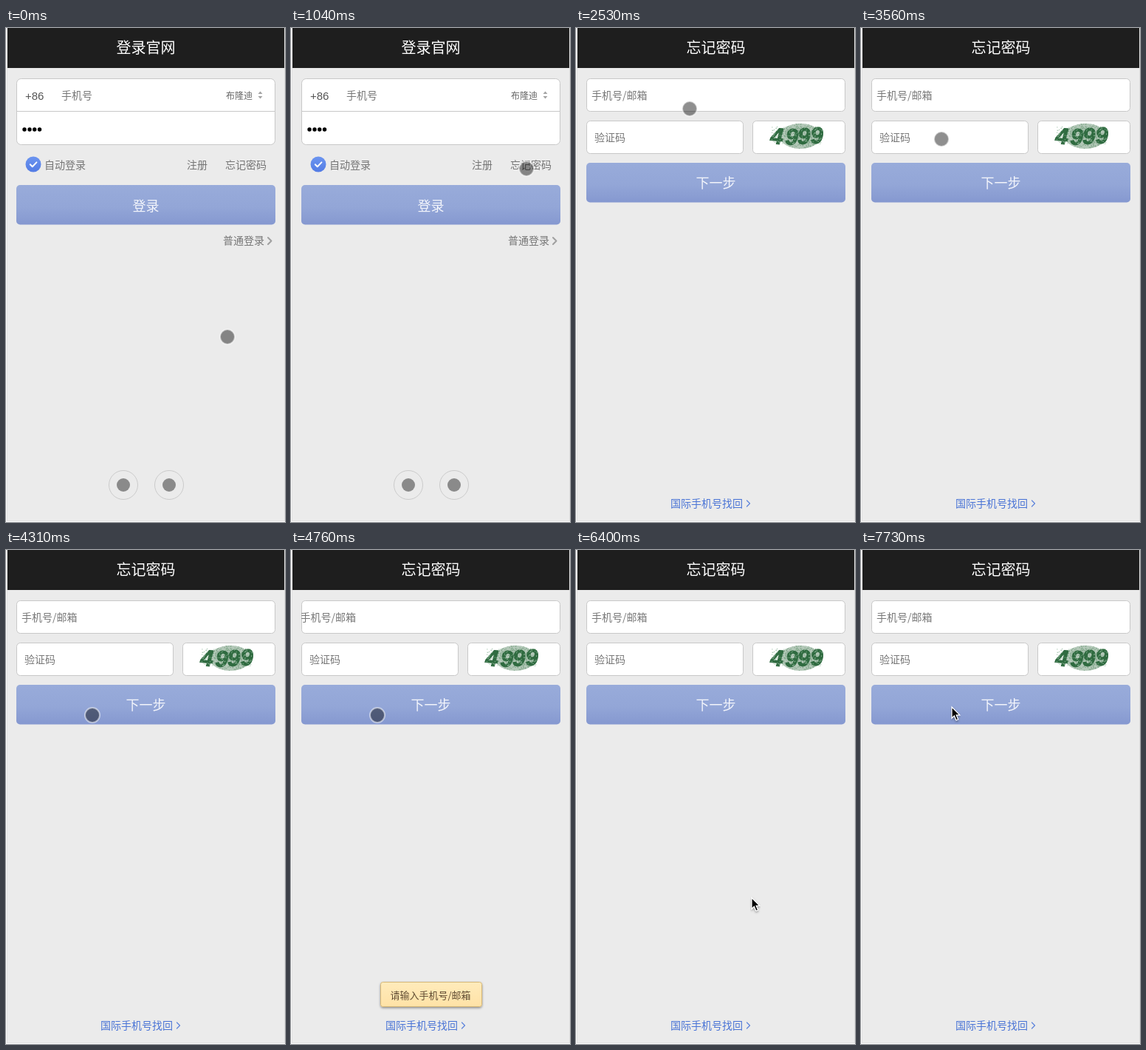
An HTML page that plays this animation: 378x667 px, repeating every 8000 ms.

```html
<!DOCTYPE html>
<html lang="zh">
<head>
<meta charset="utf-8">
<style>
  html, body { margin: 0; width: 100%; height: 100%; overflow: hidden; background: #fff; }
  svg { display: block; width: 378px; height: 667px; }
  text { font-family: "Noto Sans CJK SC", "Noto Sans CJK", sans-serif; white-space: pre; }
  .field { fill: #fff; stroke: #c8c8c8; }
  .line { fill: none; stroke-linecap: round; stroke-linejoin: round; }
</style>
</head>
<body>
<svg viewBox="0 0 378 667">
  <defs>
    <linearGradient id="blue" x2="0" y2="1">
      <stop offset="0" stop-color="#98abda"/>
      <stop offset=".55" stop-color="#93a6d7"/>
      <stop offset="1" stop-color="#8598d0"/>
    </linearGradient>
    <linearGradient id="tick" x2="0" y2="1">
      <stop offset="0" stop-color="#6c95f0"/>
      <stop offset="1" stop-color="#527be4"/>
    </linearGradient>
    <linearGradient id="cream" x2="0" y2="1">
      <stop offset="0" stop-color="#ffebbb"/>
      <stop offset="1" stop-color="#ffe2a6"/>
    </linearGradient>
    <filter id="shade" x="-10%" y="-30%" width="120%" height="170%">
      <feDropShadow dx="0" dy="1.5" stdDeviation="1.5" flood-opacity=".4"/>
    </filter>
    <clipPath id="inner"><rect x="14" y="70" width="350" height="42"/></clipPath>
    <clipPath id="oval"><ellipse cx="304" cy="146" rx="28" ry="17"/></clipPath>
  </defs>

  <rect x="1.5" y="-1" width="376" height="666.5" fill="#ebebeb" stroke="#e0e0e0"/>
  <rect x="2" width="375" height="54" fill="#1e1e1e"/>

  <g id="login">
    <rect class="field" x="14.5" y="68.5" width="350" height="89" rx="6"/>
    <path d="M15 112.5h349" stroke="#c8c8c8"/>
    <path d="M341.500 89l3-3.500 3 3.500zM341.500 92l3 3.500 3-3.500z" fill="#a3a3a3"/>
    <path class="line" d="M25 137h.01M32 137h.01M38.700 137h.01M45.500 137h.01" stroke="#000" stroke-width="5.400"/>
    <circle cx="37" cy="184" r="10.500" fill="url(#tick)"/>
    <path class="line" d="M32.800 184.200l3 3 5.600-5.800" stroke="#fff" stroke-width="2"/>
    <rect x="14" y="212" width="351" height="53.500" rx="5" fill="url(#blue)"/>
    <path class="line" d="M355 283l4.500 4.500-4.500 4.500" stroke="#a0a0a0" stroke-width="2"/>
    <g fill="none" stroke="#cbcbcb">
      <circle cx="159" cy="617" r="19.500"/>
      <circle cx="221" cy="617" r="19.500"/>
    </g>
    <g fill="#8a8a8a">
      <circle cx="159" cy="617" r="9"/>
      <circle cx="221" cy="617" r="9"/>
    </g>
  </g>

  <g id="reset">
    <rect class="field" x="14.5" y="68.5" width="350" height="44" rx="5"/>
    <rect class="field" x="14.5" y="125.5" width="212" height="44" rx="5"/>
    <rect class="field" x="239.5" y="125.5" width="125" height="44" rx="5"/>
    <rect x="14" y="182" width="351" height="53.500" rx="5" fill="url(#blue)"/>
    <g clip-path="url(#oval)">
      <rect x="270" y="125" width="70" height="42" fill="#b3c8b8"/>
      <path id="grain" stroke="#79a083" stroke-width="1.200"/>
    </g>
    <text x="263 283 300 318" y="156 157 157 156" rotate="4 4 0 -2" fill="#2f6b40" stroke="#2f6b40"
      style="font: italic bold 31px 'Liberation Sans', sans-serif">4999</text>
    <path id="specks" stroke="#8db497" stroke-width="1"/>
    <path class="line" d="M231.500 638l4 4-4 4" stroke="#5d83dc" stroke-width="1.200"/>
    <g clip-path="url(#inner)"><g id="hint"></g></g>
    <path id="caret" d="M21.500 82v17" stroke="#333"/>
  </g>

  <g id="toast">
    <rect x="121.500" y="583.500" width="137" height="33" rx="3" fill="url(#cream)" stroke="#d6b878" filter="url(#shade)"/>
  </g>
  <circle id="dot" r="10" fill="#000" fill-opacity=".44" stroke="#fff" stroke-opacity=".5" stroke-width="2"/>
  <path id="arrow" d="M0 0v15l3.400-3.200 2.500 6 2.700-1.100-2.500-5.800h4.700z" stroke="#fff" stroke-width="1.200" filter="url(#shade)"/>
</svg>
<script>
const $ = id => document.getElementById(id);

// Text placed by its left edge and its vertical middle.
function label(parent, str, x, mid, size, fill, weight = 400) {
  const el = document.createElementNS("http://www.w3.org/2000/svg", "text");
  const attrs = { x, y: mid + size * 0.38, fill, "font-size": size, "font-weight": weight };
  for (const k in attrs) el.setAttribute(k, attrs[k]);
  el.textContent = str;
  $(parent).append(el);
  return el;
}

label("login", "登录官网", 149.5, 26, 20, "#fff", 500);
label("login", "+86", 26, 91, 15, "#555").style.fontFamily = "'Liberation Sans', sans-serif";
label("login", "手机号", 75, 91, 14, "#777");
label("login", "布隆迪", 298, 91, 12, "#666");
label("login", "自动登录", 52, 185, 14, "#757575", 500);
label("login", "注册", 245, 185, 14, "#757575", 500);
label("login", "忘记密码", 297, 185, 14, "#757575", 500);
label("login", "登录", 171.5, 240, 18, "#f3f5fb", 500);
label("login", "普通登录", 294, 287, 14, "#757575", 500);

label("reset", "忘记密码", 149.5, 26, 20, "#fff", 500);
label("hint", "手机号/邮箱", 21, 91, 14, "#777");
label("reset", "验证码", 25, 148, 14, "#777");
label("reset", "下一步", 162.5, 209.5, 18, "#f3f5fb", 500);
label("reset", "国际手机号找回", 128, 642, 14, "#4a74d6");
label("toast", "请输入手机号/邮箱", 134.5, 601.5, 13, "#5f4c33");

let seed = 7;
const rand = () => (seed = seed * 16807 % 2147483647) / 2147483647;
function specks(id, count, x, y, w, h) {
  let d = "";
  while (count--) d += `M${(x + rand() * w).toFixed(1)} ${(y + rand() * h).toFixed(1)}h1`;
  $(id).setAttribute("d", d);
}
specks("grain", 420, 275, 129, 58, 34);
specks("specks", 170, 265, 133, 69, 24);

const LOOP = 8000, STEP = 148.6;
// Each stop: step number, x, y
const dotPath = [
  [0, 300, 417], [3, 309, 290], [4, 309, 290], [7, 319, 190], [12, 319, 190],
  [17, 154, 109], [20, 154, 109], [24, 109, 150], [25, 109, 150], [29, 117, 223]
];
const arrowPath = [[43, 238, 469.5], [50, 150, 205], [52, 123, 212]];
const shake = [6, -8.5, 8, -6, 3, 0];

function follow(id, path, n) {
  let i = 0;
  while (i < path.length - 2 && n > path[i + 1][0]) i++;
  const [a, ax, ay] = path[i], [b, bx, by] = path[i + 1];
  const u = Math.max(0, Math.min(1, (n - a) / (b - a)));
  const e = u * u * (3 - 2 * u);
  $(id).setAttribute("transform", `translate(${ax + (bx - ax) * e} ${ay + (by - ay) * e})`);
}
const show = (id, on) => $(id).style.display = on ? "" : "none";
const within = (n, a, b) => n >= a && n < b;

function draw(now) {
  const n = Math.floor((now % LOOP + 8) / STEP);
  show("login", n < 11);
  show("reset", n >= 11);
  show("toast", within(n, 31, 43));
  show("caret", within(n, 19, 22) || within(n, 48, 51));
  show("dot", n < 43);
  show("arrow", n >= 43);
  follow("dot", dotPath, n);
  follow("arrow", arrowPath, n);
  $("hint").setAttribute("transform", `translate(${shake[n - 31] || 0} 0)`);
}

const start = performance.now();
function tick() {
  draw(performance.now() - start);
  requestAnimationFrame(tick);
}
tick();
</script>
</body>
</html>
```
